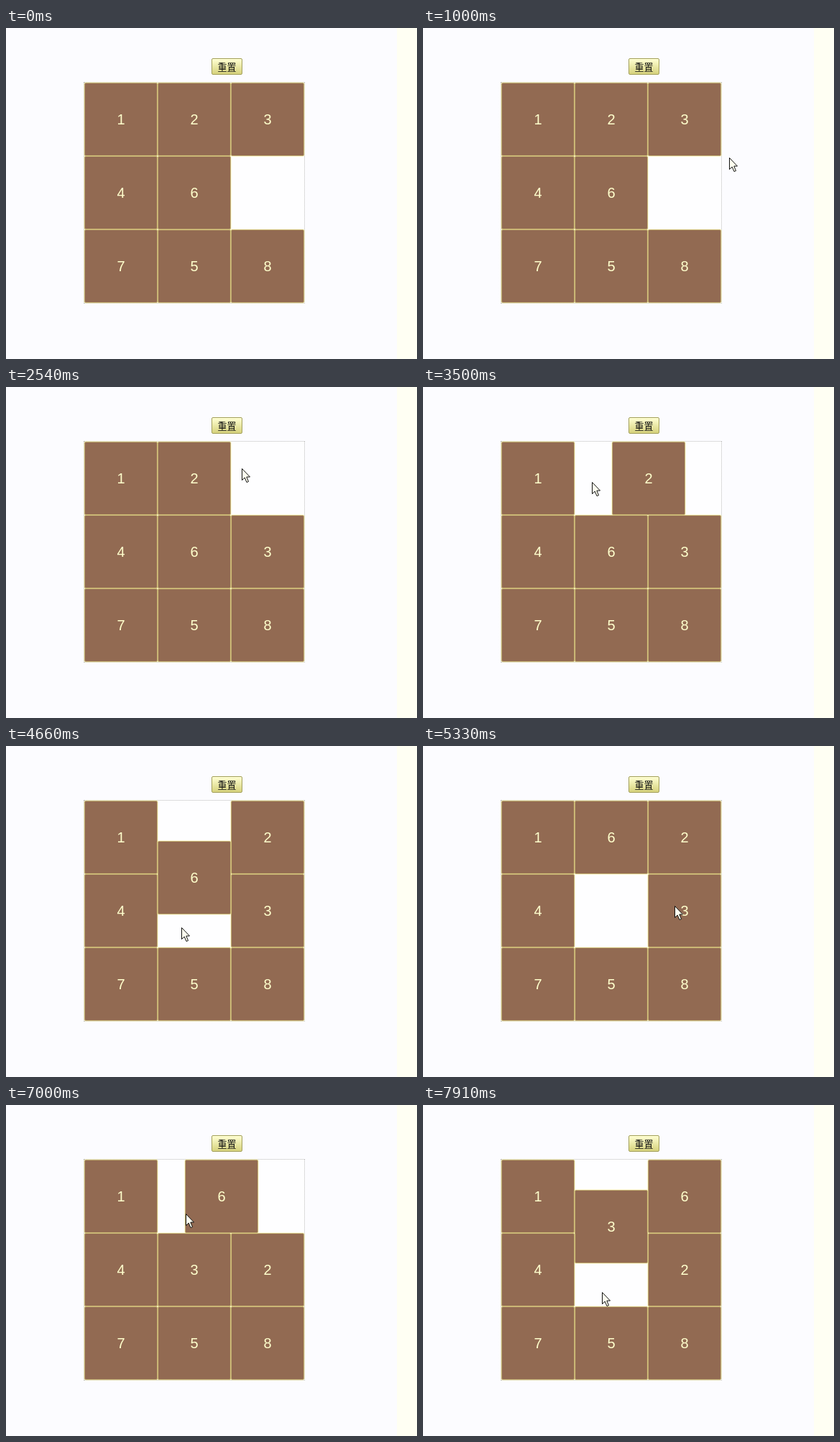
An HTML page for the animation above (8 s loop, 572 by 460 pixels).

```html
<!DOCTYPE html>
<html lang="zh-CN">
<head>
<meta charset="utf-8">
<title>Sliding puzzle</title>
<style>
  html, body { margin: 0; width: 100%; height: 100%; overflow: hidden; background: #fcfcff; }
  #stage { position: absolute; left: 0; top: 0; width: 572px; height: 460px; overflow: hidden; }
  #stage * { position: absolute; box-sizing: border-box; }
  #strip { left: 544px; top: 0; width: 28px; height: 460px; background: #fffff3; }
  #reset {
    left: 286px; top: 42px; width: 43px; height: 23px;
    border: 1px solid #a3a05c; border-radius: 2px;
    background: linear-gradient(#ffffd2, #d6d27c);
    font: 13px/22px "Noto Sans CJK SC", "Noto Sans CJK", sans-serif;
    color: #111; text-align: center; white-space: nowrap;
  }
  #board {
    left: 108px; top: 75px; width: 308px; height: 308px;
    border: 1px dotted #bbb; background: #fefeff;
  }
  .tile {
    left: 0; top: 0; width: 102px; height: 102px;
    border: 1px solid #c2ae72; border-radius: 2px;
    background: #926a52; box-shadow: 0 0 2px #fff08a;
    font: 20px/100px "Liberation Sans", Arial, sans-serif;
    color: #ffffcc; text-align: center;
  }
  #cursor { left: 0; top: 0; width: 14px; height: 22px; overflow: visible; }
</style>
</head>
<body>
<div id="stage">
  <div id="strip"></div>
  <div id="reset">重置</div>
  <div id="board"></div>
  <svg id="cursor" viewBox="0 0 14 22">
    <path d="M.5 .5V16.5L4.2 13L7 19.5L9.5 18.4L6.8 12H11.5Z" fill="#fffff0" stroke="#111"/>
  </svg>
</div>
<script>
const LOOP = 8000, CELL = 102, SLIDE = 400;
const START = [1, 2, 3, 4, 6, 0, 7, 5, 8];

// [click time, tile]: each clicked tile slides into the empty cell
const CLICKS = [[2070, 3], [3382, 2], [4554, 6], [5400, 3], [6130, 2], [6908, 6], [7774, 3]];

// [time, x, y] of the pointer tip
const POINTER = [
  [690, 574, 236], [1100, 400, 170], [1510, 258, 122], [1790, 355, 105], [1910, 368, 108],
  [2080, 368, 108], [2900, 300, 117], [3120, 235, 132], [3540, 235, 132],
  [4480, 244, 252], [4680, 244, 252], [5330, 350, 222], [5450, 350, 222],
  [5960, 389, 104], [6170, 389, 104], [6850, 250, 151], [7040, 250, 151],
  [7740, 249, 260], [LOOP, 249, 260]
];

const clamp = v => Math.max(0, Math.min(1, v));
const mix = (a, b, p) => a + (b - a) * p;
const smooth = p => p * p * (3 - 2 * p);

// cubic-bezier(.25, .1, .25, 1)
function ease(p) {
  if (p <= 0 || p >= 1) return clamp(p);
  const curve = (u, a, b) => 3 * (1 - u) ** 2 * u * a + 3 * (1 - u) * u * u * b + u ** 3;
  let low = 0, high = 1;
  for (let i = 0; i < 20; i++) {
    const mid = (low + high) / 2;
    if (curve(mid, .25, .25) < p) low = mid; else high = mid;
  }
  return curve(low, .1, 1);
}

const board = document.getElementById('board');
const cursor = document.getElementById('cursor');
const place = (el, x, y) => {
  el.style.transform = `translate(${Math.round(x)}px, ${Math.round(y)}px)`;
};

const tiles = START.filter(Boolean).sort().map(number => {
  const el = document.createElement('div');
  el.className = 'tile';
  el.textContent = number;
  board.append(el);
  return { number, el, home: START.indexOf(number) };
});

const cells = START.slice();
const moves = CLICKS.map(([time, tile]) => {
  const from = cells.indexOf(tile), to = cells.indexOf(0);
  cells[to] = tile;
  cells[from] = 0;
  return { time, tile, from, to };
});

const column = cell => cell % 3 * CELL;
const row = cell => Math.floor(cell / 3) * CELL;

function drawTiles(t) {
  for (const { number, el, home } of tiles) {
    let x = column(home), y = row(home);
    for (const { time, tile, from, to } of moves) {
      if (tile !== number || t < time) continue;
      const p = ease((t - time) / SLIDE);
      x = mix(column(from), column(to), p);
      y = mix(row(from), row(to), p);
    }
    place(el, x, y);
  }
}

function drawCursor(t) {
  const next = POINTER.findIndex(point => point[0] > t);
  cursor.style.visibility = next > 0 ? 'visible' : 'hidden';
  if (next < 1) return;
  const [t0, x0, y0] = POINTER[next - 1], [t1, x1, y1] = POINTER[next];
  const p = smooth((t - t0) / (t1 - t0));
  place(cursor, mix(x0, x1, p), mix(y0, y1, p));
}

const began = performance.now();
function frame() {
  const t = (performance.now() - began) % LOOP;
  drawTiles(t);
  drawCursor(t);
  requestAnimationFrame(frame);
}
frame();
</script>
</body>
</html>
```
